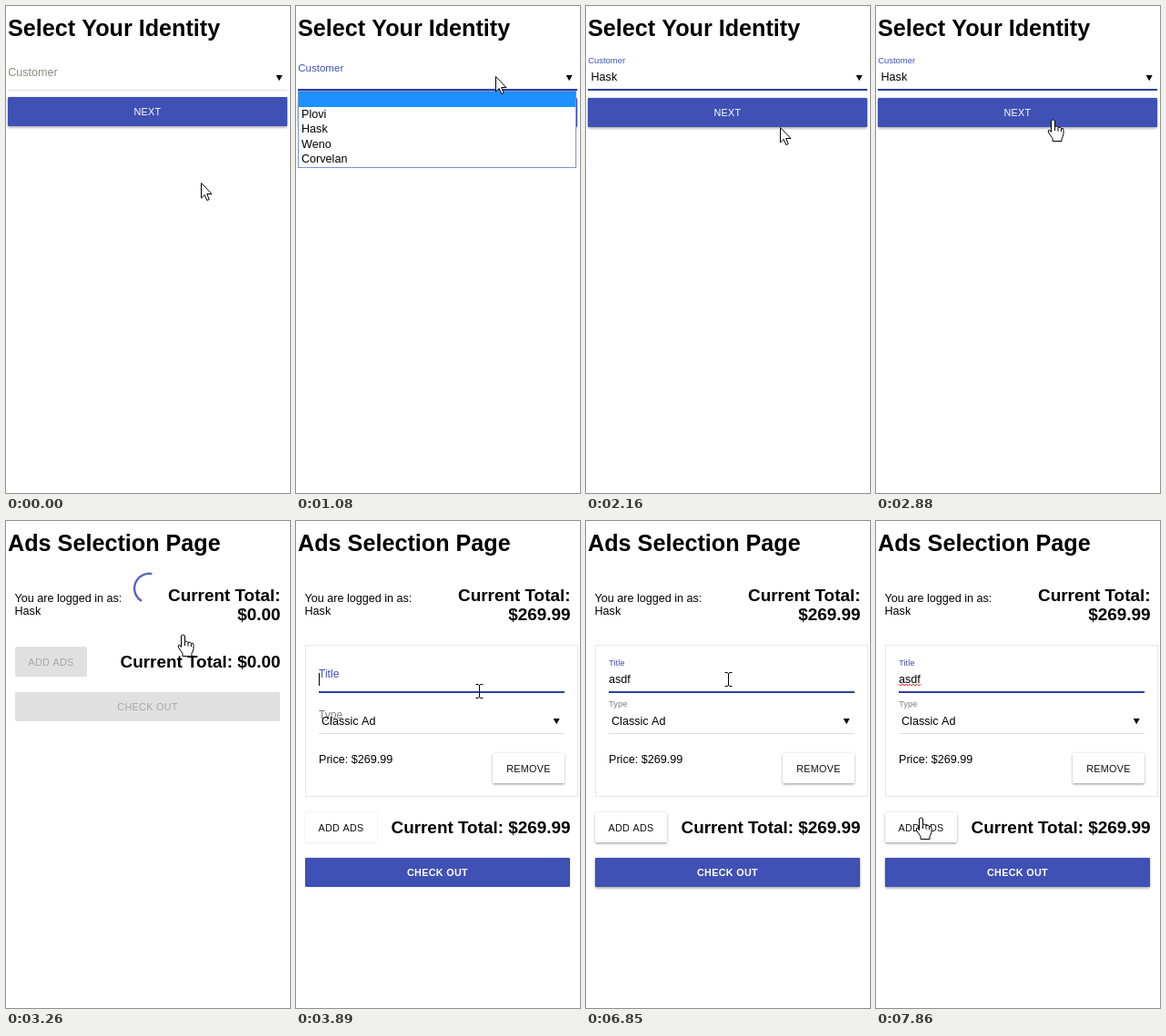
Write an HTML page with a canvas that moves like this. It is 312 by 535 pixels and loops after 8000 ms.

```html
<!DOCTYPE html>
<html lang="en">
<head>
<meta charset="utf-8">
<title>Ad order form</title>
<style>
html, body { margin: 0; width: 100%; height: 100%; overflow: hidden; background: #fff; }
canvas { display: block; width: 312px; height: 535px; }
</style>
</head>
<body>
<canvas id="stage"></canvas>
<script>
const W = 312, H = 535, LOOP = 8000;
const FONT = '"Liberation Sans", Arial, sans-serif';
const BLUE = '#3f51b5', NAVY = '#303f9f';
const BASE = 12.6;
const OPTIONS = ['', 'Plovi', 'Hask', 'Weno', 'Corvelan'];
const CHOSEN = OPTIONS[2];

// Moments at which the state changes
const OPEN = 1056, PICK = 2160, MOUNT = 2890, LOAD = 3878, SQUIGGLE = 7150;
const KEYS = [5990, 6070, 6220, 6300];
const BLINKS = [4400, 4920, 5440, 5990, 6850, 7370, 7860];

// Bursts of screen updates: first, last, count
const BURSTS = [
  [80, 220, 3], [390, 1160, 11], [1230, 1930, 10], [2160, 2160, 1],
  [2480, 2650, 3], [2800, 3580, 11], [3660, 4430, 11], [4510, 4660, 3],
  [4920, 4920, 1], [5440, 5440, 1], [5990, 6070, 2], [6220, 6300, 2],
  [6850, 6850, 1], [7080, 7860, 11]
];

// Pointer path: time, x, y
const PATH = [
  [20, 214, 194], [220, 217, 180], [310, 217, 180], [930, 219, 77],
  [1230, 219, 77], [1900, 213, 133], [2400, 213, 133], [2650, 195, 125],
  [3640, 195, 125], [3891, 201, 187], [4430, 153, 192], [4510, 152, 183],
  [4660, 156, 174], [7010, 156, 174], [7780, 50, 326]
];

const canvas = document.getElementById('stage');
const ctx = canvas.getContext('2d');
const dpr = window.devicePixelRatio || 1;
canvas.width = W * dpr;
canvas.height = H * dpr;

const clamp = v => Math.max(0, Math.min(1, v));
const mix = (a, b, p) => a + (b - a) * p;
const smooth = p => p * p * (3 - 2 * p);
const easeOut = p => 1 - (1 - p) ** 2;
const passed = (list, t) => list.filter(k => t >= k).length;

// The screen refreshes in coarse steps and rests between bursts
function snap(t) {
  let shown = 0;
  for (const [first, last, count] of BURSTS) {
    if (t < first) break;
    const step = (last - first) / (count - 1) || 1;
    const n = Math.min(count - 1, Math.floor((t - first) / step + 0.15));
    shown = Math.round(first + n * step);
  }
  return shown;
}

function pointerAt(t) {
  const i = PATH.findIndex(k => k[0] > t);
  if (i === 0) return PATH[0].slice(1);
  if (i < 0) return PATH[PATH.length - 1].slice(1);
  const [t0, x0, y0] = PATH[i - 1], [t1, x1, y1] = PATH[i];
  const p = smooth((t - t0) / (t1 - t0));
  return [mix(x0, x1, p), mix(y0, y1, p)];
}

function rect(x, y, w, h, color) {
  ctx.fillStyle = color;
  ctx.fillRect(x, y, w, h);
}

function text(str, x, y, { size = BASE, color = '#000', weight = 400, align = 'left', spacing = 0 } = {}) {
  ctx.font = `${weight} ${size}px ${FONT}`;
  ctx.letterSpacing = spacing + 'px';
  ctx.textAlign = align;
  ctx.fillStyle = color;
  ctx.fillText(str, x, y);
  ctx.letterSpacing = '0px';
}

function button(label, x, y, w, h, { fill = '#fff', color = '#111', shade = 1, weight = 400 } = {}) {
  ctx.beginPath();
  ctx.roundRect(x, y, w, h, 2);
  ctx.fillStyle = fill;
  if (shade) {
    ctx.save();
    ctx.shadowBlur = 2.5 * dpr;
    for (const [dy, alpha] of [[0, 0.12 + 0.06 * shade], [2, 0.24 * shade]]) {
      ctx.shadowColor = `rgba(0,0,0,${alpha})`;
      ctx.shadowOffsetY = dy * dpr;
      ctx.fill();
    }
    ctx.restore();
  }
  ctx.fill();
  const baseline = Math.round(y + h / 2 + 4.3);
  text(label, x + w / 2, baseline, { size: 10.8, color, weight, align: 'center', spacing: 0.32 });
}

function floatLabel(str, x, low, high, p, color) {
  text(str, x, mix(low, high, p), { size: mix(BASE, BASE * 0.75, p), color });
}

function triangle(x, y) {
  ctx.beginPath();
  ctx.moveTo(x - 3.5, y);
  ctx.lineTo(x + 3.5, y);
  ctx.lineTo(x, y + 6.2);
  ctx.fillStyle = '#000';
  ctx.fill();
}

function popup(row) {
  const pitch = 16.5;
  rect(2, 93, 306, 85, '#7a94cc');
  rect(3, 94, 304, 83, '#fff');
  rect(3, Math.round(94 + row * pitch), 304, 17, '#1e90ff');
  OPTIONS.forEach((name, i) => {
    text(name, 6, Math.round(106.4 + i * pitch), { color: i === row ? '#fff' : '#000' });
  });
}

function identityPage(t, y) {
  const focused = t >= OPEN;
  const p = easeOut(clamp((t - OPEN) / 150));
  text('Select Your Identity', 2, 33, { size: 25.2, weight: 700 });
  floatLabel('Customer', 2.2, 77, 63, p, focused ? BLUE : '#908a7c');
  triangle(300.2, 76);
  if (focused) rect(2, 91, 307, 2, NAVY);
  else rect(2, 92, 307, 1, '#dcdcdc');
  button('NEXT', 2, focused ? 101 : 100, 307, 32, { fill: BLUE, color: '#fff' });
  if (t >= PICK) text(CHOSEN, 5.5, 82);
  else if (focused) popup(Math.max(0, Math.min(4, Math.floor((y - 94) / 16.5))));
}

function spinner(t) {
  const p = (t - MOUNT) / 1400 % 1, loop = 126.9;
  const grow = smooth(clamp(p * 2)), chase = smooth(clamp(p * 2 - 1));
  const tail = 15 * grow + 110 * chase;
  const head = Math.min(loop, tail + 1 + 99 * grow);
  const angle = u => Math.PI * 2 * (p + u / loop);
  ctx.beginPath();
  ctx.arc(157.3, 74, 16.2, angle(tail), angle(head));
  ctx.strokeStyle = '#5766bd';
  ctx.lineWidth = 2.4;
  ctx.stroke();
}

function squiggle(x0, x1, y) {
  ctx.beginPath();
  for (let x = x0, i = 0; x <= x1; x += 2, i++) ctx.lineTo(x, y + (i % 2 ? 1 : -1));
  ctx.strokeStyle = '#e53935';
  ctx.lineWidth = 1;
  ctx.stroke();
}

function adCard(t) {
  const p = easeOut(clamp((t - LOAD) / 150));
  ctx.strokeStyle = '#e6e6e6';
  ctx.lineWidth = 1;
  ctx.strokeRect(10.5, 136.5, 299, 166);

  floatLabel('Title', 25, 174, 159, p, BLUE);
  rect(25, 187, 270, 2, NAVY);
  const typed = 'asdf'.slice(0, passed(KEYS, t));
  text(typed, 25, 178);
  const caretX = 25 + Math.round(ctx.measureText(typed).width);
  if (t >= SQUIGGLE) squiggle(25, 49, 180);
  if (passed(BLINKS, t) % 2 === 0) rect(caretX, 167, 1, 14, '#000');

  floatLabel('Type', 25, 219, 204, p, '#808080');
  text('Classic Ad', 28, 224);
  triangle(286.2, 217);
  rect(25, 233, 270, 1, '#dcdcdc');
  text('Price: $269.99', 25, 266);
  button('REMOVE', 216, 255, 79, 33);
}

function adsPage(t) {
  const ready = t >= LOAD;
  const dy = ready ? 182 : 0;
  const total = ready ? '$269.99' : '$0.00';
  const shade = clamp((t - LOAD) / 200);
  const big = { size: 18.9, weight: 700, align: 'right' };
  const off = { fill: '#e0e0e0', color: '#a6a6a6', shade: 0 };

  text('Ads Selection Page', 2, 33, { size: 25.2, weight: 700 });
  text('You are logged in as:', 9.5, 89);
  text(CHOSEN, 9.5, 103);
  text('Current Total:', 301.5, 88, big);
  text(total, 301.5, 109, big);
  text('Current Total: ' + total, 301.5, 161 + dy, big);
  button('ADD ADS', 10, 138 + dy, 79, 33, ready ? { shade } : off);
  button('CHECK OUT', 10, 188 + dy, 291, 32,
    ready ? { fill: BLUE, color: '#fff', weight: 700, shade } : off);
  if (ready) adCard(t);
  else spinner(t);
}

const ARROW = new Path2D('M0 0V16.5L3.7 13L6.3 19L8.8 18L6.2 12H11.5Z');
const HAND = new Path2D('M-3 13V.5Q-1 -1.8 1 .5V7Q3.5 5.5 4.5 8Q7 6.5 8 9Q10.5 8 10.5 11V15Q10 18 8.5 20V23H-1.5V20L-6 13.5Q-7 10.5 -5 10.5Z');
const KNUCKLES = new Path2D('M1 7V11.5M4.5 8V12M8 9V12.5');
const BEAM = new Path2D('M-4 -7.5H-1.5L0 -6.5L1.5 -7.5H4M0 -6.5V6.5M-4 7.5H-1.5L0 6.5L1.5 7.5H4');

function pointerKind(t, x, y) {
  if (t < OPEN) return y >= 100 && y < 132 ? 'hand' : 'arrow';
  if (t < PICK) return 'arrow';
  if (t < 3650) return y < 133 ? 'hand' : 'arrow';
  if (t >= LOAD && y >= 164 && y < 189) return 'beam';
  return x < 89 && y >= 320 ? 'hand' : 'arrow';
}

function pointer(kind, x, y) {
  ctx.save();
  ctx.translate(Math.round(x) + 0.5, Math.round(y) + (kind === 'beam' ? 0 : 0.5));
  ctx.lineWidth = 1;
  ctx.strokeStyle = '#000';
  ctx.fillStyle = '#fff';
  if (kind === 'beam') {
    ctx.stroke(BEAM);
  } else {
    const shape = kind === 'hand' ? HAND : ARROW;
    ctx.fill(shape);
    ctx.stroke(shape);
    if (kind === 'hand') ctx.stroke(KNUCKLES);
  }
  ctx.restore();
}

function draw(now) {
  const t = snap(now % LOOP);
  const [x, y] = pointerAt(t);
  ctx.setTransform(dpr, 0, 0, dpr, 0, 0);
  rect(0, 0, W, H, '#fff');
  if (t < MOUNT) identityPage(t, y);
  else adsPage(t);
  pointer(pointerKind(t, x, y), x, y);
}

let start;
function tick(now) {
  start ??= now;
  draw(now - start);
  requestAnimationFrame(tick);
}
requestAnimationFrame(tick);
</script>
</body>
</html>
```
